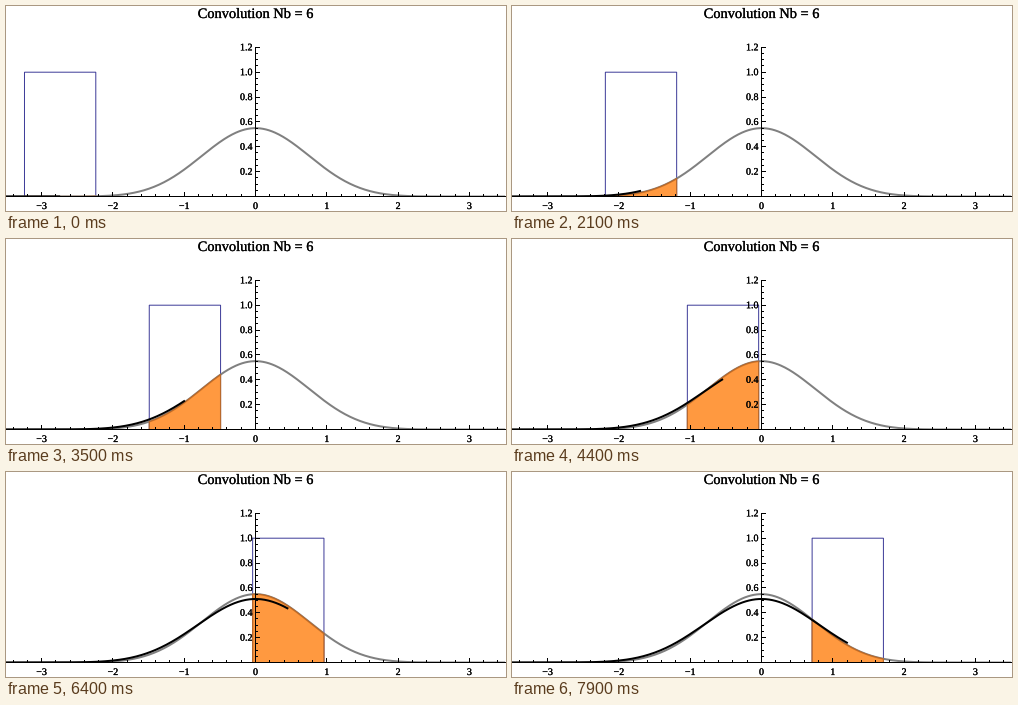
These frames come from a looping animation (500x205 px, 8 s). A matplotlib script:

```python
from math import comb, factorial, floor

import matplotlib.pyplot as plt
import numpy as np
from matplotlib.animation import FuncAnimation
from matplotlib.patches import Rectangle
from matplotlib.patheffects import withStroke

W, H, DPI = 500, 205, 64
PX = 72 / DPI                 # points per pixel
X0, Y0 = 249.5, 190.5         # plot origin on the stage
SX, SY = 71.3, 124.3          # pixels per unit
FRAMES, INTERVAL = 80, 100
START, STEP = -2.74, 0.05     # centre of the sliding box
ORDER = 6

BLUE, GREY, ORANGE, BROWN = "#3f3d99", "#808080", "#ff8010", "#b8692c"


def px(x):
    return X0 + SX * np.asarray(x)


def py(y):
    return Y0 - SY * np.asarray(y)


def crisp(v):
    """Centre of the pixel that holds v."""
    return floor(v) + 0.5


def spline(n, x):
    """Unit box convolved with itself to order n; even in x."""
    x = -np.abs(np.asarray(x, float))
    terms = ((-1) ** k * comb(n, k) * np.maximum(x + n / 2 - k, 0) ** (n - 1)
             for k in range(n + 1))
    return sum(terms) / factorial(n - 1)


plt.rcParams.update({"font.family": "Liberation Serif", "text.hinting": "none"})
fig = plt.figure(figsize=(W / DPI, H / DPI), dpi=DPI, facecolor="white")
ax = fig.add_axes([0, 0, 1, 1])
ax.set_xlim(0, W)
ax.set_ylim(H, 0)
ax.axis("off")

plot_area = Rectangle((0, 0), W, Y0, transform=ax.transData)


def curve(color, width, z, x=(), y=()):
    line, = ax.plot(x, y, color=color, lw=width * PX, zorder=z, snap=False,
                    solid_capstyle="butt", solid_joinstyle="miter")
    line.set_clip_path(plot_area)
    return line


def axis_line(x, y):
    ax.plot(x, y, color="black", lw=PX, zorder=8, snap=False,
            solid_capstyle="butt")


def label(x, y, text, size, ha="center"):
    ax.text(x, y, text, fontsize=size * PX, ha=ha, va="baseline", zorder=9,
            path_effects=[withStroke(linewidth=0.25 * PX, foreground="black")])


def draw_axes():
    axis_line([0, W], [Y0, Y0])
    axis_line([X0, X0], [Y0, crisp(py(1.2)) - 0.5])
    for i in range(-17, 18):
        x = crisp(px(i / 5))
        axis_line([x, x], [Y0, Y0 - (4.5 if i % 5 == 0 else 2.5)])
    for i in range(1, 25):
        y = crisp(py(i / 20))
        axis_line([X0, X0 + (4.5 if i % 4 == 0 else 2.5)], [y, y])
    for i in range(-3, 4):
        label(px(i), 203, str(i).replace("-", "\u2212"), 10)
    for i in range(1, 7):
        label(246.5, py(i / 5) + 3, f"{i / 5:.1f}", 10, ha="right")


draw_axes()
label(X0, 12, f"Convolution Nb = {ORDER}", 14.4)

grid = np.linspace(-3.5, 3.5, 500)
curve(GREY, 2, 3, px(grid), py(spline(ORDER, grid)))
box = curve(BLUE, 1, 2)
area, = ax.fill([0], [0], color=ORANGE, alpha=0.8, lw=0, zorder=4, snap=False)
rim = curve(BROWN, 1.2, 5)
result = curve("black", 2, 6)


def update(i):
    c = START + STEP * i
    left, right = c - 0.5, c + 0.5
    box.set_data(px([left, left, right, right]), py([0, 1, 1, 0]))

    x = np.linspace(left, right, 80)
    xs = px(np.r_[left, x, right])
    ys = py(np.r_[0, spline(ORDER, x), 0])
    area.set_xy(np.column_stack([xs, ys]))
    rim.set_data(xs, ys)

    x = np.linspace(-3.5, c, 300)
    result.set_data(px(x), py(spline(ORDER + 1, x)))
    return box, area, rim, result


anim = FuncAnimation(fig, update, frames=FRAMES, interval=INTERVAL,
                     init_func=lambda: update(0), repeat=True, repeat_delay=0)
plt.show()
```
